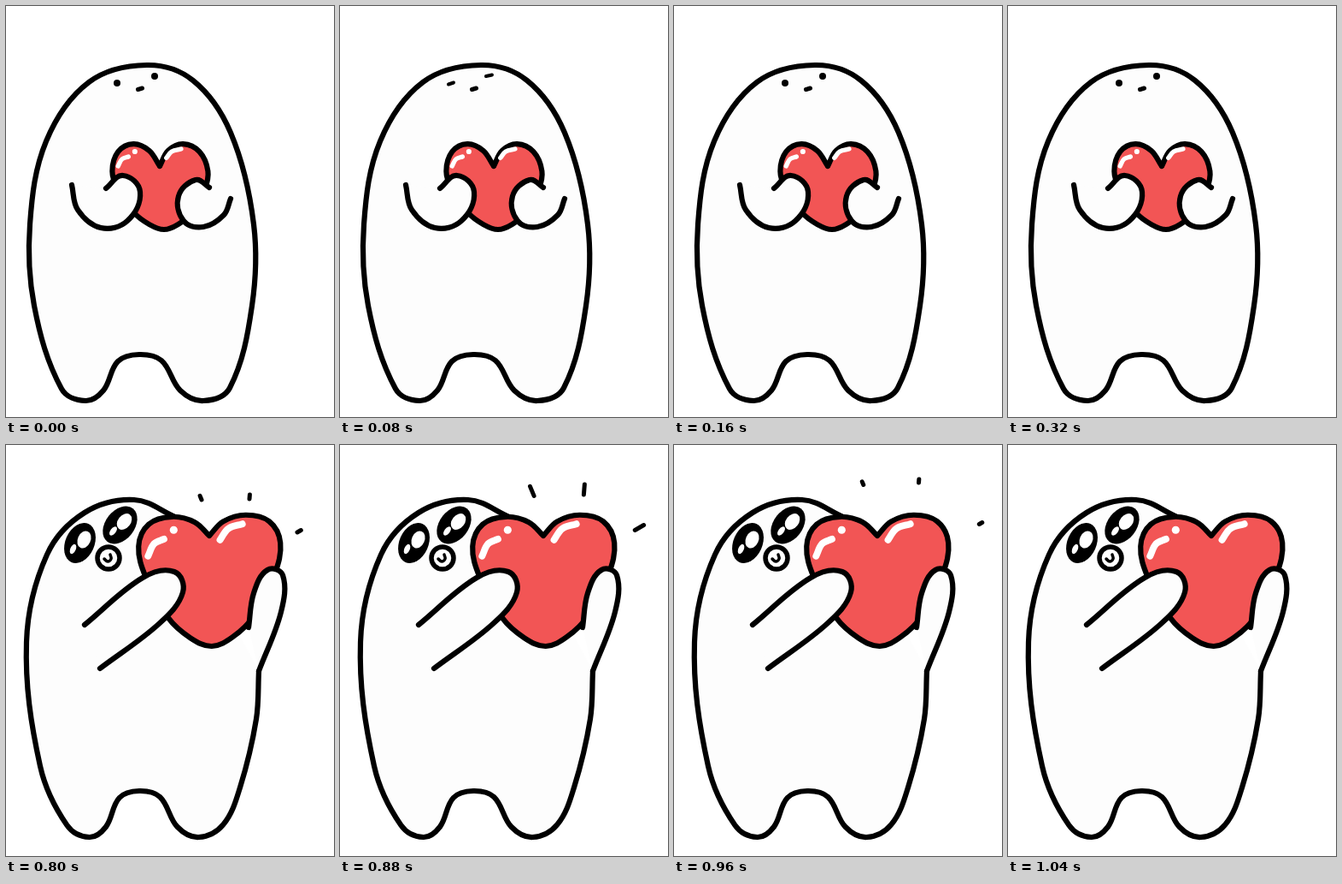
Animation, 384 px wide and 480 px high, one loop 2.24 s. Source, as an HTML page:

```html
<!DOCTYPE html>
<html lang="en">
<head>
<meta charset="utf-8">
<title>Heart hug</title>
<style>
  html, body { margin: 0; width: 100%; height: 100%; overflow: hidden; background: #fff; }
  svg { display: block; width: 100%; height: 100%; }
</style>
</head>
<body>
<svg id="stage" viewBox="0 0 384 480"></svg>
<script>
const LOOP = 2240, STEP = 80;
const INK = '#000', SKIN = '#fdfdfd', RED = '#f25555', PEN = 6.2;

const parse = text => text.trim().split(/\s+/).map(s => s.split(',').map(Number));

// Smooth path: each handle follows its neighbours' direction, a third of the span long
function curve(p, closed) {
  const n = p.length;
  const at = i => closed ? p[(i + n) % n] : p[Math.max(0, Math.min(n - 1, i))];
  const handle = (from, a, b, len) => {
    const k = 0.35 * len / (Math.hypot(b[0] - a[0], b[1] - a[1]) || 1);
    return [from[0] + (b[0] - a[0]) * k, from[1] + (b[1] - a[1]) * k];
  };
  let d = 'M' + p[0];
  for (let i = 0; i < (closed ? n : n - 1); i++) {
    const [a, b, c, e] = [at(i - 1), at(i), at(i + 1), at(i + 2)];
    const len = Math.hypot(c[0] - b[0], c[1] - b[1]);
    d += `C${handle(b, a, c, len)} ${handle(c, e, b, len)} ${c}`;
  }
  return closed ? d + 'Z' : d;
}

const line = (pts, { fill = 'none', stroke = INK, width = PEN, closed = false } = {}) =>
  `<path d="${curve(pts, closed)}" fill="${fill}" stroke="${stroke}" stroke-width="${width}"/>`;
const limb = text => line(parse(text), { fill: SKIN });
const mark = (text, width) => line(parse(text), { width });
const oval = (x, y, rx, ry = rx, turn = 0, fill = INK, width = 0) =>
  `<ellipse rx="${rx}" ry="${ry}" transform="translate(${x} ${y}) rotate(${turn})"
    fill="${fill}" stroke="${INK}" stroke-width="${width}"/>`;
const group = (id, body) => `<g id="${id}" display="none">${body}</g>`;

// Feet shared by every pose, right to left
const FEET = parse('262,446 231,461 204,449 182,414 156,407 131,415 114,449 93,461 65,447');

function body(right, left, { squeeze = 1, rise = 0, closed = false } = {}) {
  const feet = FEET.map(([x, y]) => [156 + (x - 156) * squeeze, y - rise]);
  return line([...parse(right), ...feet, ...parse(left)], { fill: SKIN, closed });
}

// Heart hung at its dip: side = half width vector, down = dip to tip, lobe = lobe height
function heart(dip, side, down, lobe) {
  const place = ([u, v]) => [0, 1].map(k => dip[k] + u * side[k] + v * down[k]);
  const half = [[0.2, -0.7 * lobe], [0.52, -lobe], [0.85, -0.65 * lobe],
    [1, 0.08], [0.91, 0.36], [0.61, 0.73], [0.3, 0.92]];
  const mirror = half.map(([u, v]) => [-u, v]).reverse();
  const rim = [[0, 0], ...half, [0, 1], ...mirror, [0, 0]];
  const gloss = text => line(parse(text).map(([u, v]) => place([u, v + 0.18 - lobe])),
    { stroke: '#fff', width: side[0] * 0.095 });
  const [x, y] = place([-0.5, 0.12 - lobe]);
  return line(rim.map(place), { fill: RED }) +
    gloss('-.64,.02 -.78,.06 -.87,.17') + gloss('.15,.04 .27,-.06 .47,-.1') +
    oval(x, y, side[0] * 0.055, side[0] * 0.055, 0, '#fff');
}

const calm =
  body('165,69 219,87 263,148 290,255 288,350', '33,350 28,255 47,158 97,89', { closed: true }) +
  heart([180, 187], [56, 0], [5, 74], 0.35) +
  limb('117,213 137,198 157,217 142,251 111,259 84,238 77,209') +
  limb('238,212 222,203 202,222 208,251 231,258 255,244 263,225') +
  mark('154.5,97.5 159.5,96', 5) +
  group('open', oval(130, 90, 4) + oval(174, 82, 4)) +
  group('shut', mark('127,91.5 133,89.5', 4) + mark('171,82 178,80.5', 4));

const smallEye = (x, y) => oval(x, y, 17, 12, -22) +
  oval(x - 4, y + 1, 5.5, 4.5, -35, '#fff') + oval(x + 6, y - 5, 3.2, 2.4, -30, '#fff');

const lift =
  body('290,262 293,310 282,385', '36,365 27,240 45,140 84,93 164,66 202,78 218,101',
    { squeeze: 0.97 }) +
  smallEye(102, 107) + smallEye(151.5, 94) +
  oval(132, 121.5, 12, 8.5, -20, '#fff', 5) + oval(132, 121.5, 3.2, 2, -15) +
  heart([214, 116], [83, -20], [7, 133], 0.15) +
  limb('290,262 312,205 311,162 294,155 278,175 278,206') +
  limb('108,207 122,206 140,179 158,171 176,192 171,234 133,259 85,243');

const bigEye = (x, y, turn) => oval(x, y, 17, 24.5, turn) +
  oval(x + 5, y - 4, 7.5, 10.5, turn, '#fff') + oval(x - 8, y + 7, 3.2, 6, turn, '#fff');

const offer =
  body('296,264 293,320 274,400', '40,375 24,230 48,128 92,79 150,64 198,84',
    { squeeze: 0.93, rise: 3 }) +
  bigEye(86.5, 114.5, 24) + bigEye(133.5, 93.5, 38) +
  oval(120, 132, 13, 13, 0, '#fff', 5.5) + mark('122,128 123,133 119,136 115,133', 3.5) +
  heart([238, 106], [83, -2], [3, 129], 0.18) +
  limb('296,264 322,195 324,152 306,146 290,173 284,213') +
  limb('92,210 160,155 197,148 207,172 180,208 110,261');

// Three sparks fly outwards: start point, direction, then the span covered at each step
const rays = [[229, 64, -0.38, -0.92], [285, 63, 0.08, -1], [341, 102, 0.86, -0.5]];
const spans = [[0, 5], [5, 17], [19, 23]];
const sparks = spans.map((span, i) => group('spark' + i, rays.map(([x, y, dx, dy]) =>
  line(span.map(r => [x + dx * r, y + dy * r]), { width: 5 })).join('')));

const stage = document.getElementById('stage');
stage.innerHTML = '<g stroke-linecap="round" stroke-linejoin="round">' +
  group('calm', calm) + group('lift', lift) + group('offer', offer) + sparks.join('') + '</g>';

const show = (id, on) =>
  document.getElementById(id).setAttribute('display', on ? 'inline' : 'none');

function draw(t) {
  const step = Math.floor(t / STEP);
  const blink = step === 1 || step === 3;
  show('calm', step < 9);
  show('open', !blink);
  show('shut', blink);
  show('lift', step === 9);
  show('offer', step > 9);
  spans.forEach((_, i) => show('spark' + i, step === 10 + i));
}

const start = performance.now();
function tick() {
  draw((performance.now() - start) % LOOP);
  requestAnimationFrame(tick);
}
tick();
</script>
</body>
</html>
```
